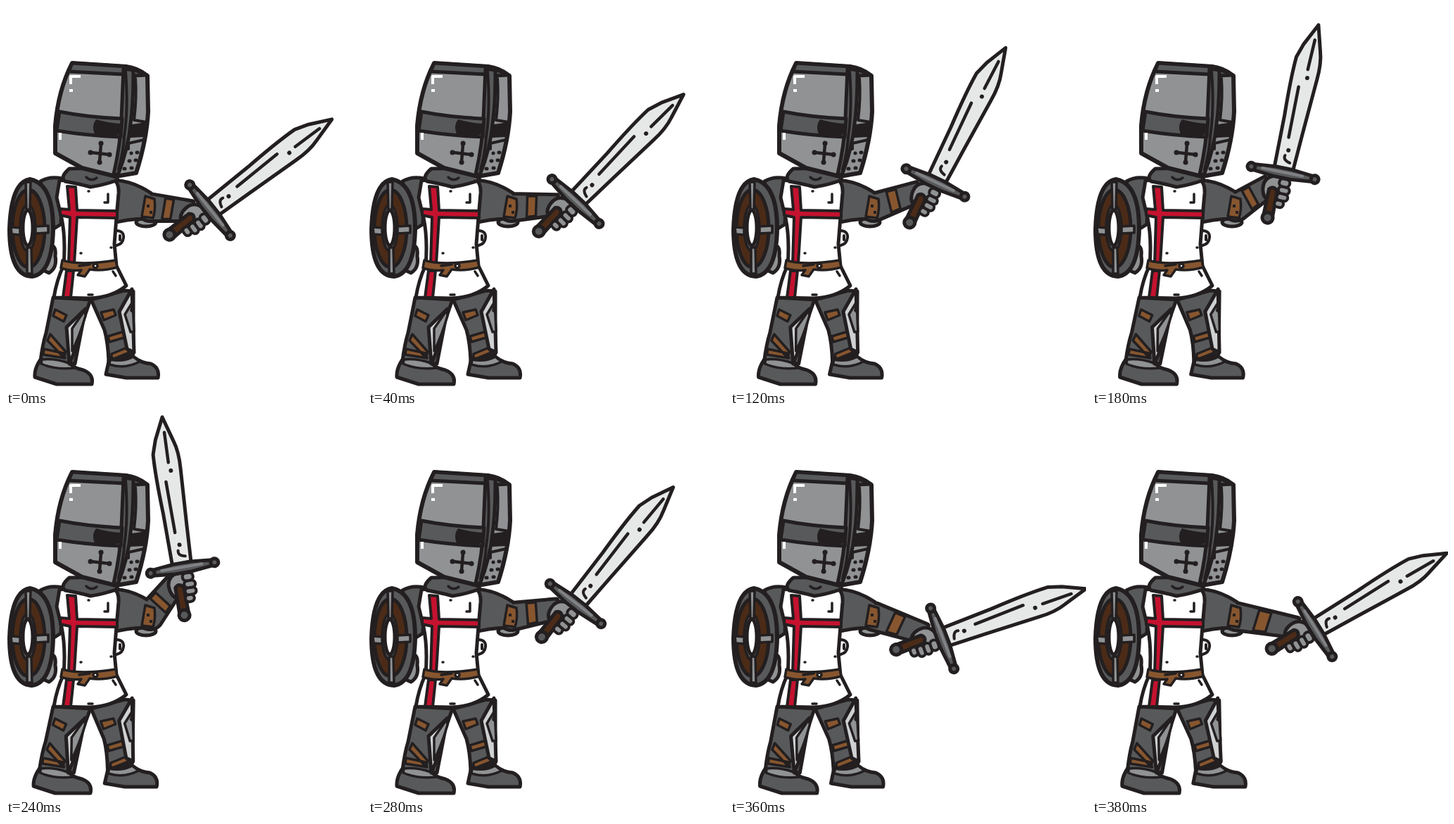
An HTML page for the animation above (400 ms loop, 506x541 px).

```html
<!DOCTYPE html>
<html lang="en">
<head>
<meta charset="utf-8">
<title>Knight</title>
<style>
  html, body { margin: 0; width: 100%; height: 100%; overflow: hidden; background: #fff; }
  svg { display: block; width: 506px; height: 541px; stroke: #231f20; stroke-width: 5; stroke-linejoin: round; stroke-linecap: round; fill: none; }
  .iron { fill: #58595b; }
  .steel { fill: #909294; }
  .pale { fill: #cfd1d2; }
  .blade { fill: #e6e8e8; }
  .hide { fill: #87562f; stroke-width: 3.5; }
  .wood { fill: #4b2b17; }
  .white { fill: #fff; }
  .red { fill: #c4122f; stroke-width: 4; }
  .ink { fill: #231f20; stroke: none; }
  .thin { stroke-width: 3.5; }
  .glint { stroke: #fff; stroke-width: 4; stroke-linecap: butt; }
</style>
</head>
<body>
<svg viewBox="0 0 506 541">
  <g id="legs">
    <path class="iron" d="M67 414L120 417L110 446L98 508L49 504Q52 480 57 464Z"/>
    <path class="hide" d="M70 431L86 439L82 448L67 440ZM63 466L85 491L82 499L59 475ZM54 487L82 493L84 500L53 495Z"/>
    <path class="iron" d="M49 502L89 508Q99 515 110 517Q125 523 122 537H72L41 527Q40 515 49 502Z"/>
    <path class="steel thin" d="M51 502Q69 500 89 507L97 514Q70 517 50 508Z"/>
    <path class="pale" d="M113 430L86 456L90 508Q102 482 103 462Z"/>
    <path class="steel thin" d="M112 432L94 458L94 490Q104 470 113 440Z"/>
    <path class="iron" d="M121 417L168 404L181 405V494L146 505Q145 478 140 460Z"/>
    <path class="hide" d="M135 435L153 431L156 439L139 446ZM145 469L168 462L171 470L147 477ZM150 494L172 485L175 492L150 502Z"/>
    <path class="iron" d="M147 500Q164 505 181 498Q192 507 206 508Q219 514 216 528H171L142 523Z"/>
    <path class="steel thin" d="M148 502Q166 506 181 498L190 505Q169 516 147 509Z"/>
    <path class="pale" d="M179 402L161 434L172 487L182 492Z"/>
    <path class="steel thin" d="M180 420L169 438L177 463L182 462Z"/>
    <path class="ink" d="M178 424l4 0v14l-6 -5z"/>
  </g>

  <path d="M158 319Q168 320 167 329T157 340M162 326v6" stroke-width="4"/>

  <g id="arm">
    <ellipse class="steel" cx="199" cy="307" rx="14" ry="6"/>
    <path id="limbEdge" stroke-width="10"/>
    <path id="limb" class="iron" stroke="none"/>
    <path class="hide" d="M198 270L211 274Q213 289 209 301L193 299Z"/>
    <path class="ink" d="M200 282h4v4h-4zM204 291h4v4h-4z"/>
    <path id="band" class="hide"/>
  </g>

  <path class="iron" d="M49 249Q62 241 80 245L78 310L62 320Z"/>
  <path class="steel" d="M60 340Q72 338 70 355Q73 372 61 379L50 374Z"/>

  <path class="white" d="M76 248L98 246Q120 258 152 247Q161 250 160 266L157 300L154 338L157 369L171 397Q151 414 119 415L68 414Q72 389 82 368Q85 330 79 301L72 272Z"/>
  <path class="red" d="M87 256L99 257L101 290L158 291V301L101 300L97 366H89L91 300L77 297V288L90 289ZM86 376H96L92 414H81Z"/>
  <path class="hide" d="M80 361Q105 369 156 361L158 371Q137 377 119 374L112 384L102 382L107 375Q91 377 78 372Z"/>
  <path d="M104 369L119 367" class="thin"/>
  <circle class="white thin" cx="127" cy="369" r="3"/>
  <path class="thin" d="M145 267V279H140M117 410h6M106 351h1M149 343h1M117 263h1M152 377l4 6" stroke-width="3"/>

  <path class="iron" d="M90 231Q76 243 84 249Q106 253 120 257Q140 254 159 247L150 230Z"/>
  <path class="thin" d="M114 243Q121 250 129 244"/>

  <g id="helmet">
    <path class="steel" stroke-width="6" d="M94 81L171 86Q187 88 201 99L202 150Q200 190 185 237L156 242L108 230L70 209L70 170Q74 120 94 81Z"/>
    <path class="iron" d="M94 81L171 86L200 98L182 99L166 97L89 93Z"/>
    <path class="iron" d="M167 89L181 91Q181 140 177 167Q174 202 159 240L153 239Q163 195 164 160Z"/>
    <path class="iron" d="M76 150Q115 158 165 160L163 186Q115 184 72 177Z"/>
    <path d="M170 93Q174 145 168 186Q167 206 160 232" stroke-width="4"/>
    <path d="M184 103Q186 130 182 162L200 165" stroke-width="4"/>
    <path class="ink" d="M128 161Q145 166 162 167V182Q144 188 126 182Q121 170 128 161ZM179 168L200 165Q201 177 196 186L177 187Q174 176 179 168Z"/>
    <path d="M174 195L196 190M174 196V203" stroke-width="4"/>
    <path d="M178 209h.1M186 208h1M175 220h1M184 219h1M168 231h1M178 230h1" stroke-width="5"/>
    <path d="M135 196L133 221M121 208L147 211" stroke-width="4.5"/>
    <path d="M135 195h.1M133 222h.1M120 208h.1M147 211h.1" stroke-width="7"/>
    <path class="glint" d="M92 111V100H106M90 120h5"/>
    <path class="glint" stroke-width="6" d="M77 180V190"/>
  </g>

  <g id="shield">
    <path class="iron" stroke-width="6" fill-rule="evenodd" d="M34 246Q67 252 67 316Q66 380 37 384Q5 383 5 317Q7 250 34 246Z"/>
    <ellipse class="wood" cx="32" cy="316" rx="23" ry="55"/>
    <ellipse class="iron thin" cx="31" cy="315" rx="11" ry="33"/>
    <ellipse class="white" cx="31" cy="315" rx="7" ry="25"/>
    <path class="steel thin" d="M28 250H35L34 289H29ZM30 343H36L37 380H30ZM7 314L20 315V325L8 324ZM42 313L60 312V322L42 323Z"/>
  </g>

  <g id="sword">
    <path class="steel" d="M-6 -8Q-10 -24 -25 -23Q-40 -22 -43 -10L-42 2L-8 5Z"/>
    <path class="wood" d="M-64 -13L-27 -14Q-20 -9 -27 -2L-64 0Z"/>
    <circle class="iron" cx="-67" cy="-6.5" r="7.5"/>
    <g class="steel" stroke-width="4">
      <rect x="-49" y="-2" width="10" height="13" rx="5"/>
      <rect x="-39" y="-1" width="10" height="16" rx="5"/>
      <rect x="-29" y="-1" width="10" height="16" rx="5"/>
      <rect x="-19" y="-2" width="11" height="15" rx="5"/>
    </g>
    <path class="blade" d="M6 -14L80 -17Q135 -21 165 -20L185 -14L216 0L181 11Q164 17 140 16L60 14L6 13Z"/>
    <path d="M51 -4L124 -7M151 0L194 0" stroke-width="4.5"/>
    <path d="M139 2h.1M33 0h.1" stroke-width="6"/>
    <path d="M16 6Q18 -5 25 -3" stroke-width="4"/>
    <g transform="rotate(-2)">
      <path class="iron" d="M-4 -43H4L7 -12V12L4 43H-4L-7 12V-12Z"/>
      <path d="M1 -30V28" stroke="#808285" stroke-width="4"/>
      <circle class="iron" cy="-46" r="5.5"/>
      <circle class="iron" cy="46" r="5.5"/>
    </g>
  </g>
</svg>
<script>
  const LOOP = 400, STEP = 20, ELBOW = [204, 286], HIP = 415;
  // time, sword angle, guard x, guard y, foot sway
  const poses = [
    [0, -36.7, 290, 290, 0],
    [80, -52.7, 300, 265, 0],
    [120, -62.5, 292, 251, -.5],
    [180, -76.5, 271.5, 237, -1.5],
    [240, -97.7, 251, 217, -2],
    [280, -50, 295, 268, 0],
    [320, 2.6, 271, 344, 1],
    [380, -29.9, 317, 304, 2],
    [400, -36.7, 290, 290, 0]
  ];
  const get = id => document.getElementById(id);
  const sword = get('sword'), legs = get('legs'), band = get('band');
  const limbs = [get('limbEdge'), get('limb')];

  function poseAt(t) {
    const i = poses.findIndex(p => p[0] > t);
    const a = poses[i - 1], b = poses[i], k = (t - a[0]) / (b[0] - a[0]);
    return a.map((v, n) => v + (b[n] - v) * k);
  }

  function drawArm(wx, wy) {
    const [ex, ey] = ELBOW, dx = wx - ex, dy = wy - ey, len = Math.hypot(dx, dy);
    // point along the forearm (0..1), offset sideways
    const at = (k, side) =>
      `${(ex + dx * k - dy / len * side).toFixed(1)} ${(ey + dy * k + dx / len * side).toFixed(1)}`;
    const shape = 'M155 250Q180 251 205 268L209 300L186 300Q172 301 158 304Z' +
      `M${at(0, -17)}L${at(1, -12)}L${at(1, 12)}L${at(0, 17)}A17 17 0 0 1 ${at(0, -17)}Z`;
    limbs.forEach(l => l.setAttribute('d', shape));
    band.setAttribute('d', `M${at(.36, -15)}L${at(.56, -14)}L${at(.52, 14)}L${at(.32, 15)}Z`);
  }

  function draw(now) {
    const t = Math.floor(now % LOOP / STEP) * STEP;
    const [, angle, x, y, sway] = poseAt(t);
    const r = angle * Math.PI / 180, c = Math.cos(r), s = Math.sin(r);
    sword.setAttribute('transform', `translate(${x} ${y}) rotate(${angle})`);
    drawArm(x - 22 * c + 15 * s, y - 22 * s - 15 * c);
    const skew = Math.atan(sway / 120) * 180 / Math.PI;
    legs.setAttribute('transform', `translate(0 ${HIP}) skewX(${skew}) translate(0 ${-HIP})`);
  }

  const start = performance.now();
  function tick() {
    draw(performance.now() - start);
    requestAnimationFrame(tick);
  }
  tick();
</script>
</body>
</html>
```
